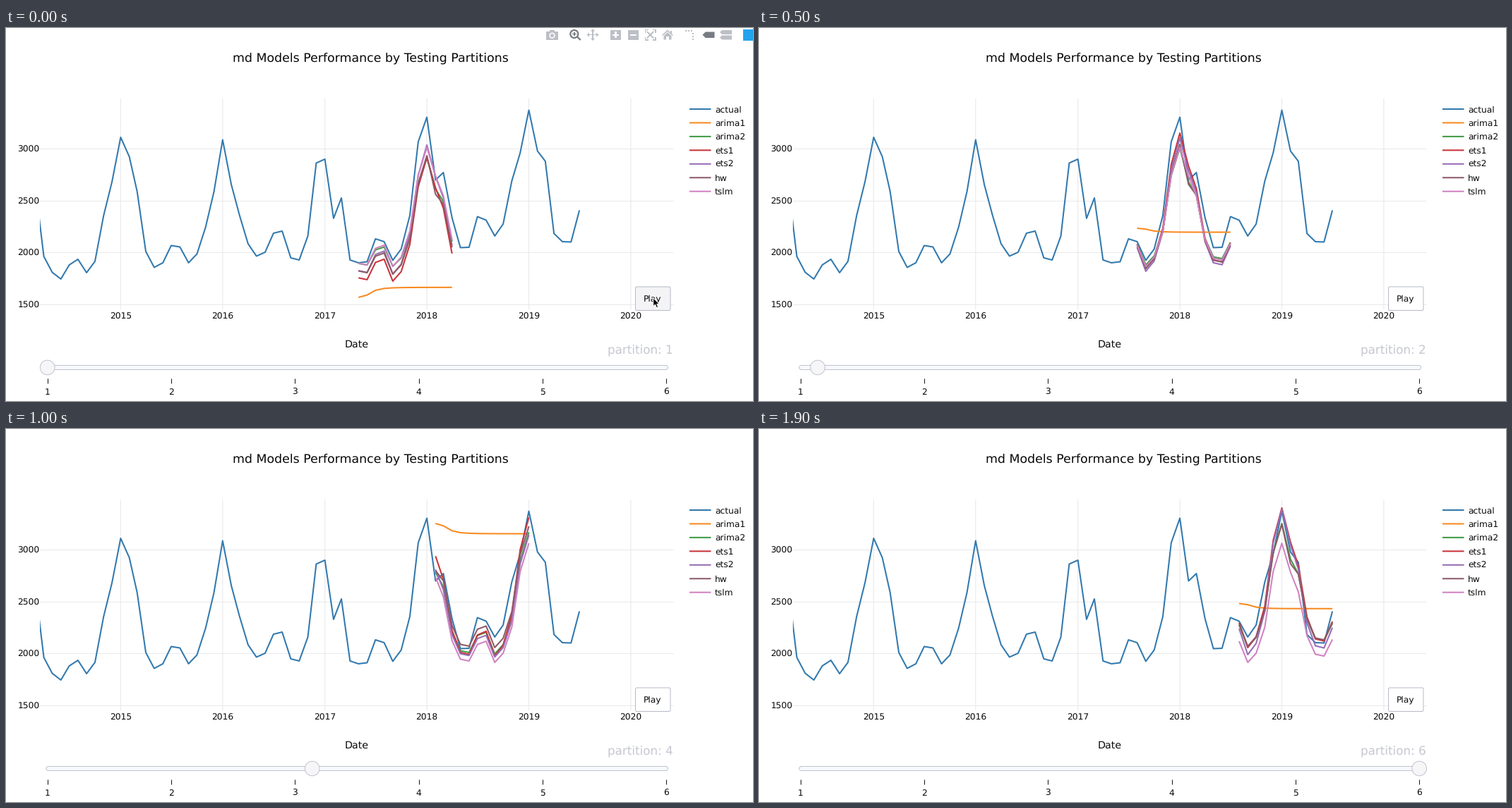
A matplotlib script for the animation above (2 s loop, 1058 px wide and 529 px high).

```python
import numpy as np
import matplotlib.pyplot as plt
from matplotlib.animation import FuncAnimation
from matplotlib.colors import to_rgb
from matplotlib.patches import Circle, FancyBboxPatch, Polygon, Rectangle

W, H, DPI = 1058, 529, 64
PT = 72 / DPI  # points per pixel
FRAMES, STEP = 20, 100

plt.rcParams.update({"font.family": "DejaVu Sans", "text.hinting": "none"})
fig = plt.figure(figsize=(W / DPI, H / DPI), dpi=DPI, facecolor="white")
ax = fig.add_axes([0, 0, 1, 1])
ax.set(xlim=(0, W), ylim=(H, 0))
ax.axis("off")

# Observed monthly heights on the stage, March 2014 to July 2019.
ACTUAL = [
    223, 324, 346.5, 356, 336, 328, 347, 331, 266, 218,
    155, 182.5, 232, 317, 339.5, 333, 308.5, 310.5, 333, 320.5, 282.5, 232,
    158.5, 222, 265, 306, 323.5, 318, 291, 288, 326, 329, 295, 191.5,
    186, 270, 241, 329, 333, 331.5, 299, 303, 329.5, 313.5, 266, 161.5,
    126.5, 215.5, 205, 269, 311.5, 311, 267.5, 272.5, 295, 278, 217, 177,
    116.5, 174.5, 189, 291.5, 303, 303.5, 258.5,
]
# Seasonal shape shared by the models, January to December 2018.
SEASON = np.array([169, 210, 238, 300, 326.5, 329, 305.5, 301, 331, 318, 281, 202])
YEARLY_RISE = 7
FIRST = 38  # first forecast month, counted from March 2014

COLORS = {
    "actual": "#3279ae", "arima1": "#f88a20", "arima2": "#419b46",
    "ets1": "#c9333a", "ets2": "#976db6", "hw": "#8e5a68", "tslm": "#d182c1",
}
# Shift of each model at the summer trough, at the winter peak and in February;
# the first two are given for a few partitions and interpolated between them.
KEY_PARTS = [0, 1, 4, 5]
SHIFTS = {
    "arima2": ([0, -2, -17, -22], [14, 1, -24, -28], 8),
    "ets1": ([21, 3, -15, -21], [15, -20, -45, -50], 0),
    "ets2": ([11, 7, -15, -11], [-3, -13, -11, -48], 0),
    "hw": ([11, 3, -33, -23], [12, -4, -34, -27], 14),
    "tslm": ([0] * 4, [0] * 4, 0),
}
# The non-seasonal model slides from a start height to a flat one.
FLAT_START = [382, 284, 306, 134, 301.5, 247.5]
FLAT_END = [367.8, 289.6, 296, 148.6, 292, 254.8]


def forecast(name, part):
    idx = np.arange(12)
    if name == "arima1":
        weight = 1 / (1 + (idx / 1.5) ** 3)
        return FLAT_END[part] + (FLAT_START[part] - FLAT_END[part]) * weight
    months = FIRST + 3 * part + idx + 2  # counted from January 2014
    season = SEASON[months % 12]
    depth = (SEASON.max() - season) / np.ptp(SEASON)
    troughs, peaks, february = SHIFTS[name]
    low, high = (np.interp(part, KEY_PARTS, v) for v in (troughs, peaks))
    rise = YEARLY_RISE * (months // 12 - 4)
    return season - rise + low + (high - low) * depth + february * (months % 12 == 1)


def text(x, y, s, px, ha="center", color="#080808", z=5):
    return ax.text(x, y, s, fontsize=px * PT, ha=ha, va="baseline", color=color, zorder=z)


def line(xs, ys, color, px=2.04, z=2, snap=False):
    return ax.plot(xs, ys, color=color, lw=px * PT, zorder=z, snap=snap,
                   solid_capstyle="butt", solid_joinstyle="round")[0]


def rounded(x, y, w, h, r, fill, edge, z):
    return ax.add_patch(FancyBboxPatch(
        (x, y), w, h, boxstyle=f"round,pad=0,rounding_size={r}",
        fc=fill, ec=edge, lw=PT, zorder=z))


def day_x(dates):
    days = dates.astype("datetime64[D]") - np.datetime64("2015-01-01")
    return 162.4 + 0.3957 * days.astype(int)


# Title, grid and axes
text(516.5, 48, "md Models Performance by Testing Partitions", 17.4)
text(496.5, 453, "Date", 14.2)
for i in range(4):
    y = 391.5 - 73.4 * i
    line([48, 945], [y, y], "#e9e9ec", 1, 1, True)
    text(47.5, y + 5, str(1500 + 500 * i), 12.25, "right")
for year in range(2015, 2021):
    x = day_x(np.datetime64(f"{year}-01-01"))
    line([x, x], [100, 399], "#e9e9ec", 1.1, 1)
    text(x, 412.6, str(year), 12.25)

# Series
x_all = day_x(np.arange("2014-03", "2019-08", dtype="datetime64[M]"))
actual = line(x_all, ACTUAL, COLORS["actual"])
actual.set_clip_path(Rectangle((48, 100), 897, 299, transform=ax.transData))
models = {name: line([], [], color, z=3)
          for name, color in COLORS.items() if name != "actual"}

# Legend
for i, (name, color) in enumerate(COLORS.items()):
    y = 115 + 19.45 * i
    line([968, 998.5], [y, y], color)
    text(1004, y + 4.4, name, 12.25, "left")

# Button
button = rounded(891.5, 367, 49.5, 33.5, 2, "white", "#b6bac8", 6)
text(915.8, 387, "Play", 12.25, z=7)

# Slider
SLIDER_X, SLIDER_STEP = 58.7, 175.3
rounded(57, 478.5, 880.5, 6, 3, "#f8f9fc", "#bfc3d0", 3)
for i in range(6):
    x = SLIDER_X + SLIDER_STEP * i
    line([x, x], [497, 504], "#222222", 1.1, 3, True)
    text(x, 520.3, str(i + 1), 12.25)
grip = ax.add_patch(Circle((SLIDER_X, 481.5), 10.3, fc="#f6f6f8", ec="#c2c4cc",
                           lw=PT, zorder=4))
value = text(945, 462, "", 16.7, "right", "#c6c8d0")

# Toolbar
GREY, DARK, BLUE = "#bcbfc5", "#777b82", "#22a3ee"
tools = []


def tool(patch, color):
    ax.add_patch(patch)
    patch.set_linewidth(0)
    tools.append((patch, np.array(to_rgb(color))))


def block(x, y, w, h, color=GREY):
    tool(Rectangle((x, y), w, h, zorder=5), color)


def shape(points, color=GREY):
    tool(Polygon(points, zorder=5), color)


def disc(x, y, r, color=GREY):
    tool(Circle((x, y), r, zorder=5), color)


def tag(x, y, h, color=GREY):
    shape([(x, y + h / 2), (x + h / 2, y), (x + 17, y),
           (x + 17, y + h), (x + h / 2, y + h)], color)


# camera
block(765, 5, 17, 12)
block(770, 3, 7, 3)
disc(773.5, 10.7, 4.2, "white")
disc(773.5, 10.7, 2.6)
# zoom
disc(804.8, 8.5, 6.6, DARK)
disc(804.8, 8.5, 4.4, "white")
block(802, 7.6, 5.6, 1.8, DARK)
block(803.9, 5.7, 1.8, 5.6, DARK)
shape([(808.6, 13.6), (810.2, 12), (814.5, 16.2), (812.9, 17.8)], DARK)
# pan
block(825, 8.8, 12, 1.6)
block(830.2, 4, 1.6, 12)
for dx, dy in [(1, 0), (-1, 0), (0, 1), (0, -1)]:
    shape([(831 + dx * 8.5, 9.6 + dy * 8.5),
           (831 + dx * 5 - 3 * dy, 9.6 + dy * 5 + 3 * dx),
           (831 + dx * 5 + 3 * dy, 9.6 + dy * 5 - 3 * dx)])
# zoom in and out
for x in (856, 881):
    block(x, 2.5, 15, 14.5)
    block(x + 3, 8.6, 9, 2.4, "white")
block(862.3, 5.3, 2.4, 9, "white")
# autoscale
for sx in (-1, 1):
    for sy in (-1, 1):
        corner = [(8, 8), (3, 8), (3, 6.4), (6.4, 6.4), (6.4, 3), (8, 3)]
        arm = [(5.5, 4.3), (4.3, 5.5), (-0.8, 0.8), (0.8, -0.8)]
        for part in (corner, arm):
            shape([(912.5 + sx * x, 9.7 + sy * y) for x, y in part])
# home
shape([(929, 10), (937, 2.5), (945, 10), (944, 11), (937, 4.8), (930, 11)])
shape([(931.5, 11), (937, 6), (942.5, 11), (942.5, 16.5), (931.5, 16.5)])
block(935.3, 12.2, 3.4, 4.3, "white")
block(941, 3.5, 2, 4)
# spike lines
for i in range(3):
    block(962 + 4 * i, 3, 2.2, 2.2)
    block(971.8, 7 + 4 * i, 2.2, 2.2)
# hover labels
tag(986.5, 5.5, 8.5, DARK)
tag(1011, 3, 6)
tag(1011, 10.5, 6)
block(1044, 2, 14, 15.5, BLUE)

# Pointer
ARROW = [(0, 0), (0, 11.8), (2.7, 9.4), (4.7, 13.8), (6.8, 12.9), (4.9, 8.6), (8.4, 8.4)]
pointer = ax.add_patch(Polygon(np.add(ARROW, (916.8, 382.8)),
                               fc="black", ec="white", lw=0.9 * PT, zorder=9))

START, HOLD, SLIDE = 225.5, 250, 75  # ms: click, time per partition, grip move
LEAVE, FADE = 330, 100               # ms: the pointer leaves, the toolbar fades


def ease(u):
    u = min(max(u, 0), 1)
    return 4 * u ** 3 if u < 0.5 else 1 - 4 * (1 - u) ** 3


def draw(frame):
    t = frame * STEP
    part = int(np.clip((t - START) // HOLD, 0, 5))
    pos = max(0, part - 1 + ease((t - START - HOLD * part) / SLIDE))
    grip.center = (SLIDER_X + SLIDER_STEP * pos, 481.5)
    value.set_text(f"partition: {part + 1}")

    first = FIRST + 3 * part
    for name, artist in models.items():
        artist.set_data(x_all[first:first + 12], forecast(name, part))

    hover = t < LEAVE
    pointer.set_visible(hover)
    button.set_facecolor("#f4f4f7" if hover else "white")
    fade = float(np.clip(1 - (t - LEAVE) / FADE, 0, 1))
    for patch, rgb in tools:
        patch.set_facecolor(1 - (1 - rgb) * fade)
        patch.set_visible(fade > 0)
    return []


anim = FuncAnimation(fig, draw, frames=FRAMES, interval=STEP, repeat=True,
                     repeat_delay=0, blit=False)
plt.show()
```
